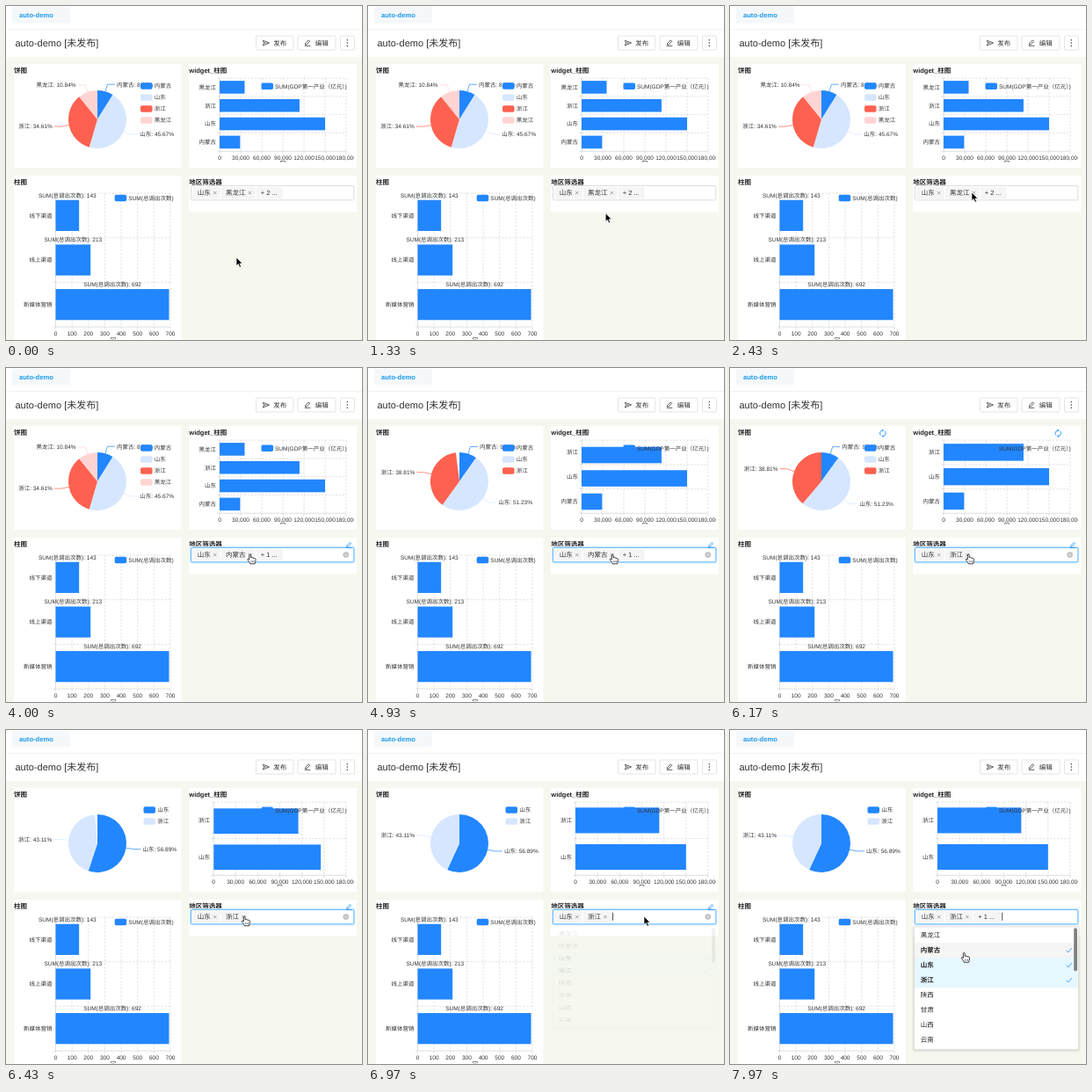
Recreate the animation shown at these times as an HTML page. Size 405x380 px, loop 8000 ms.

```html
<!DOCTYPE html>
<html lang="zh">
<head>
<meta charset="utf-8">
<title>auto-demo</title>
<style>
html, body { margin: 0; width: 100%; height: 100%; overflow: hidden; background: #f6f7ee; }
svg { display: block; width: 100vw; height: 100vh; }
text { font-family: "Liberation Sans", "Noto Sans CJK SC", "Noto Sans CJK", sans-serif; text-rendering: geometricPrecision; white-space: pre; }
</style>
</head>
<body>
<svg viewBox="0 0 405 380" xmlns="http://www.w3.org/2000/svg">
  <defs><clipPath id="card"><rect x="208" y="66" width="187.5" height="118"/></clipPath></defs>
  <g id="base"></g>
  <g id="live"></g>
</svg>
<script>
const LOOP = 8000;
const PALETTE = ['#2286ff', '#d6e6ff', '#ff6150', '#ffd4d2'];
const BLUE = PALETTE[0], LINK = '#1890ff', INK = '#333';
const SMALL = 6.5, BODY = 7.5;

const VALUES = { 内蒙古: 29164, 山东: 150000, 浙江: 113655, 黑龙江: 35603 };
const STAGES = [
  { at: 0, names: ['内蒙古', '山东', '浙江', '黑龙江'], left: 243, legend: 153 },
  { at: 4738, names: ['内蒙古', '山东', '浙江'], left: 243, legend: 153 },
  { at: 6195, names: ['山东', '浙江'], left: 236, legend: 156.5 }
];
const MORPH = 300;

const FOCUS = 3560, CUT = 5630, OPEN = 6950, PICK = 7640;
const LOADING = [[4300, 4738], [5670, 6195]];
const HANDS = [[3530, CUT], [6150, 6640], [7180, LOOP]];
// time, x, y of the pointer tip
const PATH = [
  [0, 262, 286], [850, 262, 285], [1650, 273, 219], [2430, 275, 212], [2750, 281, 213],
  [3100, 277.5, 212], [5830, 278, 212], [6200, 271, 212], [6500, 271, 212], [6880, 314, 212],
  [7020, 314, 212], [7360, 284, 268], [7600, 266, 253.5], [8000, 266, 253.5]
];

const mix = (a, b, p) => a + (b - a) * p;
const clamp = x => Math.max(0, Math.min(1, x));
const ease = x => x < .5 ? 4 * x ** 3 : 1 - (2 - 2 * x) ** 3 / 2;
const within = (t, spans) => spans.some(([a, b]) => t >= a && t < b);

const rect = (x, y, w, h, fill, more = '') =>
  `<rect x="${x}" y="${y}" width="${w}" height="${h}" fill="${fill}" ${more}/>`;
const line = (d, stroke, w = .6, more = '') =>
  `<path d="${d}" fill="none" stroke="${stroke}" stroke-width="${w}" ${more}/>`;
const text = (s, x, y, size = SMALL, fill = INK, anchor = 'start', weight = 400) =>
  `<text x="${x}" y="${y + size * .36}" font-size="${size}" fill="${fill}" text-anchor="${anchor}" font-weight="${weight}">${s}</text>`;
const key = (x, y, color) => rect(x, y - 3.8, 13.5, 7.6, color, 'rx="1.8"');

function pencil(x, y, color, k = 1) {
  return `<g transform="translate(${x} ${y}) scale(${k})">` +
    line('M-2.3 1.1L1.3 -2.7L2.7 -1.3L-.9 2.3L-2.7 2.6Z', color, .8) + line('M-3.2 3.8H3.4', color, .8) + '</g>';
}

function grid(x0, x1, y0, y1, cols, rows) {
  let s = '';
  for (let i = 1; i <= cols; i++) s += `M${mix(x0, x1, i / cols)} ${y0}V${y1}`;
  for (let i = 0; i < rows; i++) s += `M${x0} ${mix(y0, y1, i / rows)}H${x1}`;
  let ticks = `M${x0} ${y0}V${y1}H${x1}`;
  for (let i = 0; i <= cols; i++) ticks += `M${mix(x0, x1, i / cols)} ${y1}v2.5`;
  for (let i = 0; i <= rows; i++) ticks += `M${x0} ${mix(y0, y1, i / rows)}h-2.5`;
  return line(s, '#ccc', .55, 'stroke-dasharray="2.4 1.6"') + line(ticks, '#c4c7cc', .55);
}

function channelChart() {
  const x0 = 56.5, x1 = 187, y0 = 213, y1 = 365, step = (y1 - y0) / 3;
  const rows = [['线下渠道', 143], ['线上渠道', 213], ['新媒体营销', 692]];
  let s = grid(x0, x1, y0, y1, 7, 3);
  rows.forEach(([name, n], i) => {
    const w = (x1 - x0) * n / 700, y = y0 + step * (i + .5);
    s += rect(x0, y - 17.6, w, 35.2, BLUE) + text(name, 52.5, y, SMALL, INK, 'end') +
      text(`SUM(总调出次数): ${n}`, x0 + w / 2, y - 23, SMALL, INK, 'middle');
  });
  for (let i = 0; i <= 7; i++) s += text(i * 100, mix(x0, x1, i / 7), 372.7, SMALL, INK, 'middle');
  return s + key(123.7, 218.5, BLUE) + text('SUM(总调出次数)', 139.3, 218.5) +
    line('M119.3 379v-1.6h5.2v1.6M120.4 380h3', INK, .6);
}

function button(x, w, label) {
  return rect(x, 34, w, 16, '#fff', 'rx="1.3" stroke="#d9d9d9" stroke-width=".7"') +
    (label ? text(label, x + 19.7, 42, BODY) : '');
}

function basePart() {
  return rect(0, 0, 405, 58, '#fff') + rect(7, 1, 66, 18.5, '#f5f8fa') +
    rect(0, 26, 405, .8, '#eeeff0') +
    text('auto-demo', 15, 10.3, 7.6, '#1b9aee', 'start', 700) +
    text('auto-demo [未发布]', 10.5, 42, 11) +
    button(284.5, 42.5, '发布') + button(332, 43, '编辑') + button(380.5, 16) +
    line('M292.3 39.2L299.6 42L292.3 45L293.5 42ZM293.5 42H296.5', INK, .75) + pencil(343, 41.5, INK) +
    [38.8, 42, 45.2].map(y => `<circle cx="388.3" cy="${y}" r=".75" fill="${INK}"/>`).join('') +
    rect(9, 66, 190.5, 118, '#fff') + rect(208, 66, 191, 118, '#fff') +
    rect(9, 193, 190.5, 187, '#fff') + rect(208, 193, 191, 41.5, '#fff') +
    [['饼图', 9, 73], ['widget_柱图', 208.3, 73], ['柱图', 9, 200], ['地区筛选器', 208.3, 200]]
      .map(([s, x, y]) => text(s, x, y, BODY, '#222', 'start', 700)).join('') +
    channelChart();
}

function slices(stage) {
  const total = stage.names.reduce((sum, n) => sum + VALUES[n], 0);
  let end = 0;
  return stage.names.map(name => {
    const start = end, share = VALUES[name] / total;
    end += share;
    return { name, share, start, end };
  });
}

function pie(now, old, p) {
  const cx = 104, cy = 129, R = 33, before = slices(old);
  const at = (f, r) => [cx + r * Math.sin(f * 2 * Math.PI), cy - r * Math.cos(f * 2 * Math.PI)];
  let s = '', labels = '';
  slices(now).forEach((c, i) => {
    const a = mix(before[i].start, c.start, p), b = mix(before[i].end, c.end, p), m = (a + b) / 2;
    s += `<path d="M${cx} ${cy}L${at(a, R)}A${R} ${R} 0 ${b - a > .5 ? 1 : 0} 1 ${at(b, R)}Z" fill="${PALETTE[i]}"/>`;
    const [x, y] = at(m, R + 8.4), side = m < .5 ? 1 : -1;
    labels += line(`M${at(m, R)}L${x} ${y}h${side * 8.4}`, PALETTE[i], .7) +
      text(`${c.name}: ${(c.share * 100).toFixed(2)}%`, x + side * 10.6, y, SMALL, INK, side > 0 ? 'start' : 'end');
  });
  now.names.forEach((name, i) => {
    const y = 91 + i * 13;
    labels += key(now.legend, y, PALETTE[i]) + text(name, now.legend + 15.7, y);
  });
  return s + labels;
}

function bars(now, old, p) {
  const x1 = 387, y0 = 82, y1 = 165.3, n = now.names.length;
  const box = (stage, i) => {
    const step = (y1 - y0) / stage.names.length;
    return {
      x: stage.left, y: y1 - step * (i + .5), h: step * .7,
      w: (x1 - stage.left) * VALUES[stage.names[i]] / 180000
    };
  };
  let s = grid(now.left, x1, y0, y1, 6, n);
  now.names.forEach((name, i) => {
    const a = box(old, i), b = box(now, i), v = k => mix(a[k], b[k], p);
    s += rect(v('x'), v('y') - v('h') / 2, v('w'), v('h'), BLUE) +
      text(name, now.left - 4, b.y, SMALL, INK, 'end');
  });
  for (let i = 0; i <= 6; i++)
    s += text((i * 30000).toLocaleString('en-US'), mix(now.left, x1, i / 6), 173, SMALL, INK, 'middle');
  const mid = (now.left + x1) / 2;
  s += line(`M${mid - 2.4} 178v-1.6h4.8v1.6`, INK, .6) +
    key(290.5, 91.3, BLUE) + text('SUM(GDP第一产业（亿元）)', 306, 91.3);
  return `<g clip-path="url(#card)">${s}</g>`;
}

function spinner(x, y, t) {
  return `<g transform="translate(${x} ${y}) rotate(${(t - 5830) * .36})">` +
    line('M-3.2 -.6A3.3 3.3 0 0 1 2.6 -2M3.2 .6A3.3 3.3 0 0 1 -2.6 2', LINK, .8) +
    `<path d="M3.6 -3.2V-.9L1.3 -1.3ZM-3.6 3.2V.9L-1.3 1.3Z" fill="${LINK}"/></g>`;
}

function picker(t) {
  const focus = t >= FOCUS;
  const names = ['山东', t < FOCUS ? '黑龙江' : t < CUT ? '内蒙古' : '浙江'];
  const extra = t < FOCUS ? 2 : t < CUT || t >= PICK ? 1 : 0;
  let s = focus ? rect(209.7, 203.7, 186.6, 17.6, 'none', 'rx="2" stroke="#d3ebff" stroke-width="2"') : '';
  s += rect(210.5, 204.4, 185.3, 16.4, '#fff', `rx="1.3" stroke="${focus ? '#40a9ff' : '#d4d4d4'}" stroke-width=".8"`);
  let x = 213.3;
  const tag = w => rect(x, 206.2, w, 12.8, '#f5f5f5', 'rx="1" stroke="#eee" stroke-width=".5"');
  for (const name of names) {
    const w = 15 + name.length * BODY;
    s += tag(w) + text(name, x + 4.5, 212.6, BODY) +
      line(`M${x + w - 7.3} 210.9l3.4 3.4m0 -3.4l-3.4 3.4`, '#777', .65);
    x += w + 2.2;
  }
  if (extra) {
    s += tag(29) + text(`+ ${extra} ...`, x + 4.5, 212.6, BODY);
    x += 31.2;
  }
  if (t >= OPEN && (t - PICK + 2000) % 1000 < 500) s += rect(x + .5, 207.8, .8, 9, '#222');
  if (focus && t < 7080)
    s += '<circle cx="386.7" cy="212.5" r="3.3" fill="#bfbfbf"/>' +
      line('M385.4 211.2l2.6 2.6m0 -2.6l-2.6 2.6', '#fff', .7) + pencil(390, 201, LINK, .95);
  return s;
}

function menu(t, pointerY) {
  if (t < OPEN) return '';
  const p = clamp((t - OPEN) / 200), pitch = 17;
  const chosen = ['山东', '浙江'].concat(t >= PICK ? '内蒙古' : []);
  let s = [3, 2, 1].map(k => rect(210 - k, 225 - k, 186 + 2 * k, 138.5 + 2 * k, '#000', 'rx="3" opacity=".035"')).join('') +
    rect(210, 224.5, 186, 138.5, '#fff', 'rx="1.3"');
  ['黑龙江', '内蒙古', '山东', '浙江', '陕西', '甘肃', '山西', '云南'].forEach((name, i) => {
    const y = 233.7 + i * pitch, on = chosen.includes(name), hover = Math.abs(pointerY + 1 - y) < pitch / 2;
    const fill = on && !(hover && name === '内蒙古') ? '#e6f7ff' : hover ? '#f5f5f5' : '';
    if (fill) s += rect(210, y - pitch / 2, 186, pitch, fill);
    s += text(name, 216.8, y, BODY, '#222', 'start', on ? 700 : 400);
    if (on) s += line(`M382.7 ${y}l2 2.3l4 -4.8`, LINK, .8);
  });
  s += rect(391.2, 225.3, 3.8, 49, '#808080', 'rx="1.9"');
  return `<g opacity="${p}" transform="translate(0 ${224.5 * (1 - mix(.8, 1, p))}) scale(1 ${mix(.8, 1, p)})">${s}</g>`;
}

function pointerAt(t) {
  const i = Math.max(1, PATH.findIndex(k => k[0] > t)), a = PATH[i - 1], b = PATH[i];
  const p = ease(clamp((t - a[0]) / (b[0] - a[0])));
  return [mix(a[1], b[1], p), mix(a[2], b[2], p)];
}

function pointer(t, x, y) {
  const shape = within(t, HANDS)
    ? '<path d="M-.7 .9C-.7 -.5 1.2 -.5 1.2 .9V4C1.6 3.2 2.9 3.3 3 4.2C3.6 3.6 4.7 3.9 4.7 4.7C5.4 4.2 6.4 4.5 6.4 5.5V7.5C6.4 9 5.6 9.3 5.5 10.8H.3C0 9.3 -1.7 7.8 -2.6 6.2C-3 5.2 -1.9 4.6 -1.1 5.5L-.7 6Z" fill="#fff" stroke="#111" stroke-width=".8"/>' +
      line('M1.4 7.2v2M3 7.2v2M4.5 7.2v2', '#111', .5)
    : '<path d="M0 0V9.6L2.2 7.6L3.8 11.3L5.5 10.6L3.9 7H7Z" fill="#000" stroke="#fff" stroke-width=".7"/>';
  return `<g transform="translate(${x} ${y})">${shape}</g>`;
}

function scene(t) {
  const i = STAGES.filter(s => t >= s.at).length - 1;
  const now = STAGES[i], old = STAGES[Math.max(0, i - 1)];
  const p = i ? ease(clamp((t - now.at) / MORPH)) : 1;
  const [x, y] = pointerAt(t);
  const busy = within(t, LOADING) ? spinner(173.8, 74.3, t) + spinner(373.3, 74.3, t) : '';
  return pie(now, old, p) + bars(now, old, p) + busy + picker(t) + menu(t, y) + pointer(t, x, y);
}

const live = document.getElementById('live');
document.getElementById('base').innerHTML = basePart();
let shown = '';
function draw() {
  const next = scene(performance.now() % LOOP);
  if (next !== shown) live.innerHTML = shown = next;
  requestAnimationFrame(draw);
}
draw();
</script>
</body>
</html>
```
